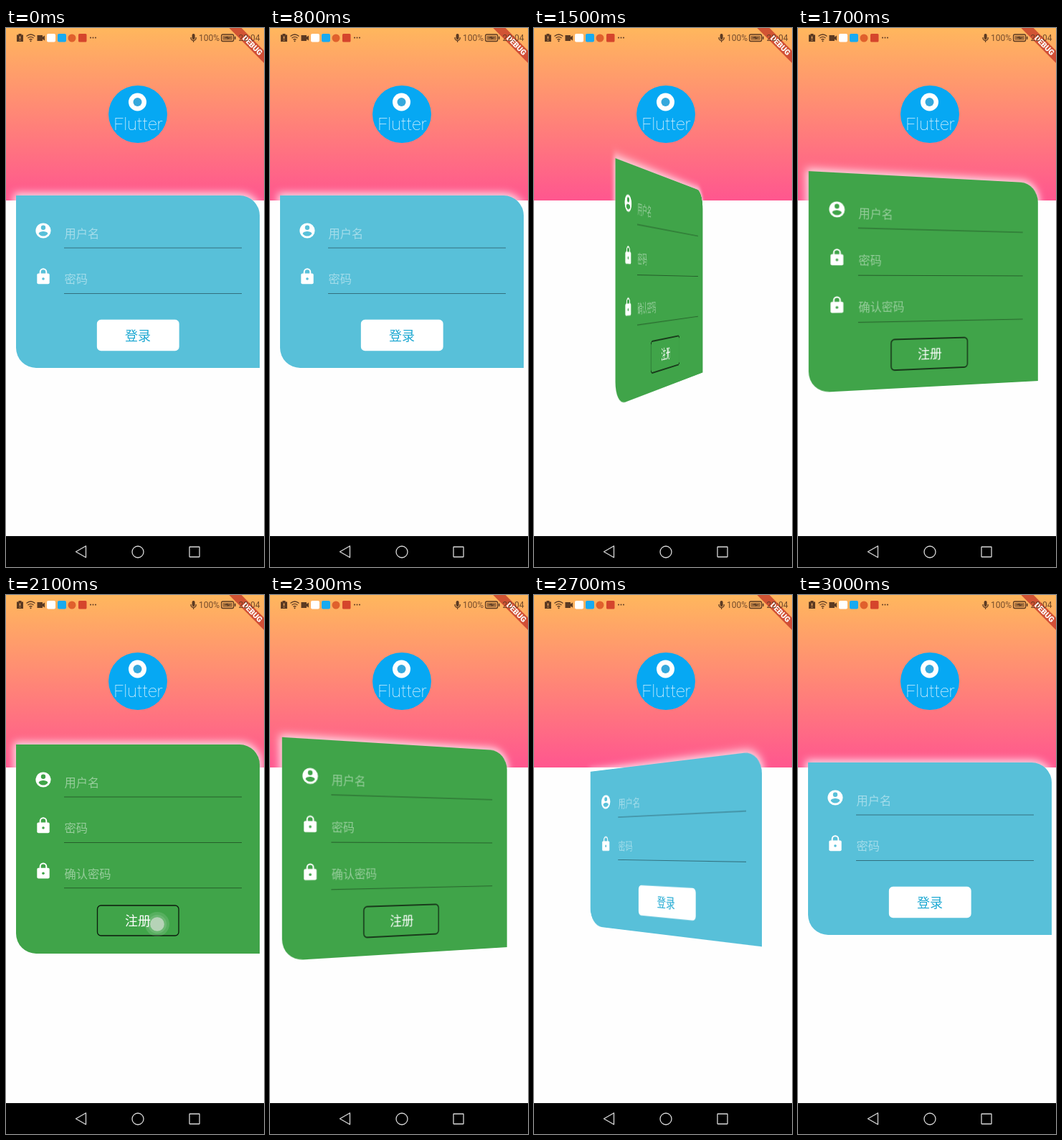
Recreate the animation shown at these times as an HTML page. Size 360 by 750 pixels, loop 3100 ms.

```html
<!DOCTYPE html>
<html lang="zh-CN">
<head>
<meta charset="utf-8">
<title>Flip card login</title>
<style>
  html, body { margin: 0; width: 100%; height: 100%; overflow: hidden; background: #fefefe; }
  #stage { position: relative; width: 360px; height: 750px; overflow: hidden; }
  svg { display: block; position: absolute; left: 0; top: 0; }
  .sky { position: absolute; width: 360px; height: 240px; background: linear-gradient(#ffb75d, #ff568f); }
  .card {
    position: absolute; left: 14px; width: 340px; border-radius: 0 28px 0 28px;
    box-shadow: 0 0 12px 3px rgba(255, 255, 255, .85);
  }
  #login { top: 233px; height: 240px; background: #58c0d9; --card: #58c0d9; }
  #register { top: 208px; height: 291px; background: #40a449; --card: #40a449; }
  .cjk { font-family: "Noto Sans CJK SC", "Noto Sans CJK", sans-serif; }
  .latin { font-family: Roboto, sans-serif; }
</style>
</head>
<body>
<div id="stage">
  <div class="sky"></div>
  <svg width="360" height="750">
    <ellipse cx="184" cy="120" rx="41" ry="40" fill="#06a8f3"/>
    <circle cx="183.5" cy="103" r="12.5" fill="#fff"/>
    <circle cx="183.5" cy="103" r="6" fill="#35a8dc"/>
    <text class="latin" x="184.5" y="142" font-size="24.5" font-weight="100" fill="#fff" text-anchor="middle">Flutter</text>
  </svg>
  <div id="login" class="card"></div>
  <div id="register" class="card"></div>
  <svg width="360" height="750">
    <g transform="translate(368.5 -.5) rotate(45) scale(1.02)">
      <rect x="-50" y="28" width="100" height="12" fill="#b71c1c" fill-opacity=".63"/>
      <text class="latin" y="37.7" font-size="10.4" font-weight="900" fill="#fff" text-anchor="middle">DEBUG</text>
    </g>
    <g id="status" fill="#5b3a22">
      <path d="M17.5 8h4v1.5H24V19h-9V9.500h2.500z"/>
      <path d="M19.500 11.500v3.500M19.500 16.200v1.300" stroke="#ffb262" stroke-width="1.300"/>
      <g fill="none" stroke="#5b3a22" stroke-width="1.300">
        <path d="M28.500 11.500q6-5 12 0M30.500 14q4-3.200 8 0M32.500 16.300q2-1.600 4 0"/>
        <path d="M258 13v.8a3.600 3.600 0 0 0 7.200 0V13M261.600 17.500v2.300"/>
        <rect x="300.600" y="9" width="17" height="9.500" rx="2"/>
      </g>
      <circle cx="34.500" cy="18.200" r="1"/>
      <path d="M43.500 10h7.500v2.500l3-2v7l-3-2V18h-7.500z"/>
      <rect x="57" y="8" width="12" height="11.500" rx="2" fill="#fff"/>
      <rect x="72" y="8" width="12" height="11.500" rx="2" fill="#18aaf0"/>
      <circle cx="92" cy="14" r="5.500" fill="#e0602c"/>
      <rect x="101" y="8" width="11.500" height="11.500" rx="1.500" fill="#d5452c"/>
      <circle cx="118" cy="13.500" r="1"/>
      <circle cx="121.500" cy="13.500" r="1"/>
      <circle cx="125" cy="13.500" r="1"/>
      <rect x="259.600" y="8" width="4" height="8" rx="2"/>
      <rect x="302.300" y="10.700" width="13.600" height="6.100" rx="1" fill-opacity=".55"/>
      <path d="M304 13.700l5.500-2v1.500h4.800l-5.500 2.600v-1.600z"/>
      <rect x="318.800" y="11.800" width="1.700" height="4"/>
      <g class="latin" font-size="12" fill-opacity=".85">
        <text x="269" y="18">100%</text>
        <text x="324.500" y="18">22:04</text>
      </g>
    </g>
    <rect y="707" width="360" height="43" fill="#000"/>
    <g fill="none" stroke="#d8d8d8" stroke-width="1.300" stroke-linejoin="round">
      <path d="M111.500 720.800v16L97.500 728.800z"/>
      <circle cx="184" cy="729" r="8"/>
      <rect x="256" y="722" width="14" height="14" rx=".5"/>
    </g>
    <g id="touch">
      <circle cx="211" cy="458" r="17" fill="#fff" fill-opacity=".12"/>
      <circle cx="211" cy="458" r="13" fill="#fff" fill-opacity=".12"/>
      <circle cx="211" cy="458" r="9.800" fill="#cfdccf" fill-opacity=".75"/>
    </g>
  </svg>
</div>
<script>
const LOOP = 3100, FLIP = 900, TO_REGISTER = 985, TO_LOGIN = 2100;
const login = document.getElementById('login');
const register = document.getElementById('register');
const touch = document.getElementById('touch');

const userIcon = y => `
  <g transform="translate(52 ${y})">
    <circle r="10.6" fill="#fff"/>
    <circle cy="-4.200" r="3.200" fill="var(--card)"/>
    <path d="M-6.400 4.200C-6.400 2-2.200 1 0 1S6.400 2 6.400 4.200Q4 7.600 0 7.600T-6.400 4.200z" fill="var(--card)"/>
  </g>`;

const lockIcon = y => `
  <g transform="translate(52 ${y})">
    <rect x="-8.700" y="-4" width="17.400" height="14.700" rx="2" fill="#fff"/>
    <path d="M-4.300-3V-6a4.300 4.300 0 0 1 8.600 0v3" fill="none" stroke="#fff" stroke-width="2"/>
    <circle cy="3.500" r="1.800" fill="var(--card)"/>
  </g>`;

const field = (icon, label, y) => icon(y - 4) + `
  <text x="81.500" y="${y + 5.8}" font-size="16.300" fill="#fff" fill-opacity=".45">${label}</text>
  <path d="M81 ${y + 20}H329" stroke="#000" stroke-opacity=".42"/>`;

const button = (label, y, fill, border, color) => `
  <rect x="127.500" y="${y}" width="113.500" height="42" rx="5" fill="${fill}" stroke="${border}" stroke-width="1.300"/>
  <text x="184" y="${y + 28.3}" font-size="18" font-weight="500" fill="${color}" text-anchor="middle">${label}</text>`;

function fill(card, top, height, parts) {
  card.innerHTML = `<svg class="cjk" width="340" height="${height}" viewBox="14 ${top} 340 ${height}">${parts.join('')}</svg>`;
}

fill(login, 233, 240, [
  field(userIcon, '用户名', 286),
  field(lockIcon, '密码', 349.5),
  button('登录', 406.5, '#fff', '#fff', '#1ca8d2')
]);
fill(register, 208, 291, [
  field(userIcon, '用户名', 261),
  field(lockIcon, '密码', 324.5),
  field(lockIcon, '确认密码', 387.7),
  button('注册', 432, 'none', '#0c1a0d', '#fff')
]);

const clamp = v => Math.min(1, Math.max(0, v));

// Cubic Bezier (.42, 0, 1, 1), solved by bisection
function easeIn(x) {
  let lo = 0, hi = 1;
  for (let i = 0; i < 24; i++) {
    const s = (lo + hi) / 2, r = 1 - s;
    if (1.26 * r * r * s + 3 * r * s * s + s * s * s < x) lo = s; else hi = s;
  }
  return lo * lo * (3 - 2 * lo);
}
const easeOut = x => 1 - easeIn(1 - x);

function pose(card, angle, shown) {
  card.style.visibility = shown ? 'visible' : 'hidden';
  card.style.transform = angle ? `perspective(1022px) rotateY(${angle}deg)` : 'none';
}

function draw(now) {
  const time = now % LOOP;
  const t = time < 500 ? 0 : Math.floor(time / 100) * 100;
  const p = clamp((t - TO_REGISTER) / FLIP) - clamp((t - TO_LOGIN) / FLIP);
  const front = p < .5;
  pose(login, front ? -90 * easeIn(p * 2) : 0, front);
  pose(register, front ? 0 : 90 * (1 - easeOut(p * 2 - 1)), !front);
  touch.style.visibility = t >= 2000 && t <= 2100 ? 'visible' : 'hidden';
}

const start = performance.now();
function tick() {
  draw(performance.now() - start);
  requestAnimationFrame(tick);
}
tick();
</script>
</body>
</html>
```
